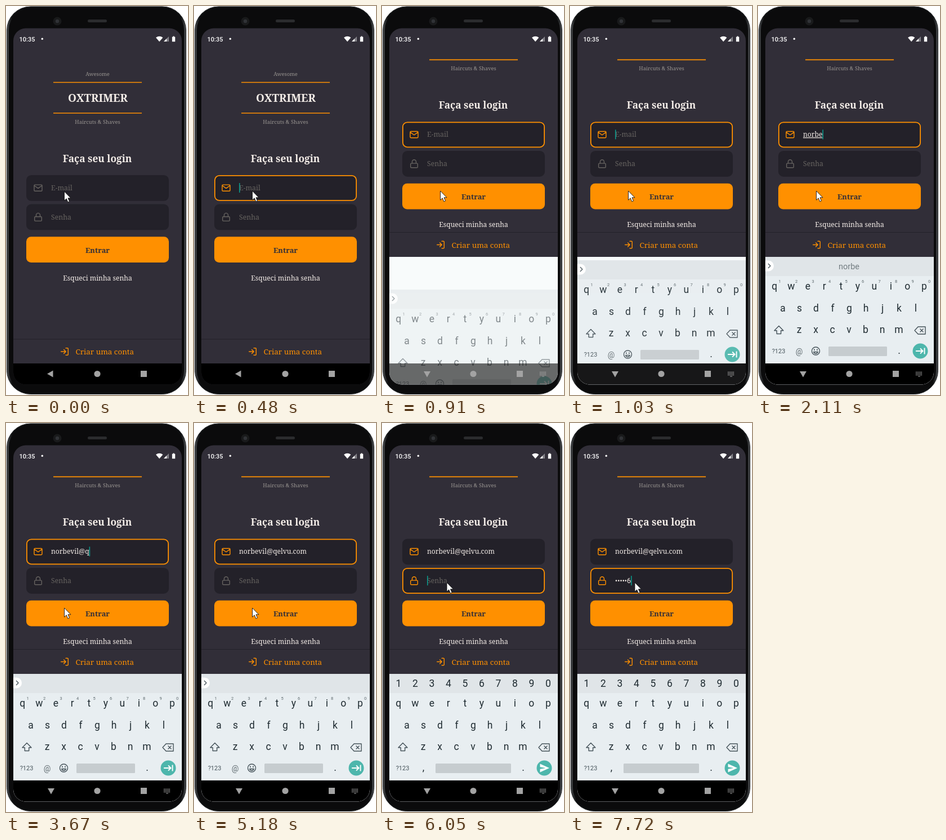
Write an HTML page that moves like this. It is 323 px wide and 690 px high and loops after 8 s.

```html
<!DOCTYPE html>
<html lang="pt">
<head>
<meta charset="utf-8">
<title>Login</title>
<style>
  html, body { margin: 0; width: 100%; height: 100%; overflow: hidden; background: #fff; }
  svg { display: block; width: 100vw; height: 100vh; }
  text { font-family: "Noto Serif", serif; fill: #f4ede8; }
  .mid { text-anchor: middle; }
  .hint { font-size: 12.3px; fill: #666360; }
  .tag { font-size: 9.3px; fill: #999591; }
  .line { fill: none; stroke-width: 2; stroke-linecap: round; stroke-linejoin: round; }
  .orange { stroke: #ff9000; }
  .field { fill: #232129; stroke: #232129; stroke-width: 1.8; }
  .field.on { stroke: #ff9000; }
  .icon { stroke: #666360; }
  .icon.on { stroke: #ff9000; }
  .roboto, #kb text, #status text { font-family: Roboto, sans-serif; }
  #kb text { fill: #1f2b31; font-size: 17.5px; text-anchor: middle; }
  #kb .sup { font-size: 7.5px; fill: #5c676c; }
  #kb .small { font-size: 11px; fill: #46535a; }
  #kb #word { font-size: 14.5px; fill: #737d82; }
  #kb.caps .letter { text-transform: uppercase; }
  .glyph { fill: none; stroke: #46535a; stroke-width: 1.4; stroke-linejoin: round; }
</style>
</head>
<body>
<svg viewBox="0 0 323 690">
  <defs>
    <clipPath id="screen"><rect x="13" y="39.5" width="299" height="632" rx="22"/></clipPath>
    <clipPath id="content"><rect x="13" y="88" width="299" height="560"/></clipPath>
    <linearGradient id="rim">
      <stop offset="0" stop-color="#4a4d50"/><stop offset=".03" stop-color="#0c0d0e"/>
      <stop offset=".97" stop-color="#0c0d0e"/><stop offset="1" stop-color="#4a4d50"/>
    </linearGradient>
  </defs>

  <rect x="1.5" y="1" width="318" height="687.5" rx="42" fill="url(#rim)" stroke="#2b2d2f"/>
  <rect x="5" y="4" width="311" height="681" rx="39" fill="#0b0b0c"/>
  <circle cx="91" cy="27" r="7.5" fill="#191a1b"/>
  <circle cx="91" cy="27" r="3.2" fill="#303236"/>
  <rect x="145" y="24" width="34" height="5" rx="2.5" fill="#2b2c2e"/>

  <g clip-path="url(#screen)">
    <rect x="13" y="39" width="299" height="633" fill="#312e38"/>

    <g clip-path="url(#content)"><g id="form">
      <text class="mid tag" x="162.5" y="124">Awesome</text>
      <path class="orange" stroke-width="1.6" d="M84 135.5h157M84 190h157"/>
      <text class="mid" x="163" y="170" font-size="19" font-weight="700">OXTRIMER</text>
      <text class="mid tag" x="162.5" y="208.5">Haircuts &amp; Shaves</text>
      <text class="mid" x="162" y="276.5" font-size="17.3" font-weight="600">Faça seu login</text>

      <rect id="mailBox" class="field" x="36.9" y="300.9" width="251.2" height="44" rx="8"/>
      <rect id="passBox" class="field" x="36.9" y="352.4" width="251.2" height="44" rx="8"/>
      <path id="mailIcon" class="line icon" transform="translate(48.6 314.3) scale(.7)"
        d="M4 4h16a2 2 0 0 1 2 2v12a2 2 0 0 1-2 2H4a2 2 0 0 1-2-2V6a2 2 0 0 1 2-2zM22 6l-10 7L2 6"/>
      <path id="passIcon" class="line icon" transform="translate(48.6 366) scale(.7)"
        d="M5 11h14a2 2 0 0 1 2 2v7a2 2 0 0 1-2 2H5a2 2 0 0 1-2-2v-7a2 2 0 0 1 2-2zM7 11V7a5 5 0 0 1 10 0v4"/>
      <text id="mailHint" class="hint" x="80" y="327">E-mail</text>
      <text id="passHint" class="hint" x="80" y="378.7">Senha</text>
      <text id="mail" x="80" y="326.7" font-size="12.1"></text>
      <text id="pass" class="roboto" x="80" y="378.7" font-size="12.5"></text>
      <rect id="caret" width="1.6" height="17" fill="#0b978a"/>

      <rect x="36" y="409.3" width="253" height="45.7" rx="8.5" fill="#ff9000"/>
      <text class="mid" x="162.5" y="437.5" font-size="12.9" font-weight="600" style="fill:#312e38">Entrar</text>
      <text class="mid" x="162.5" y="486.5" font-size="12.1">Esqueci minha senha</text>
    </g></g>

    <g id="footer">
      <rect x="13" y="591" width="299" height="44" fill="#312e38"/>
      <path d="M13 591h299" stroke="#232129"/>
      <path class="line orange" transform="translate(95.6 604.6) scale(.7)"
        d="M15 3h4a2 2 0 0 1 2 2v14a2 2 0 0 1-2 2h-4M10 17l5-5-5-5M15 12H3"/>
      <text x="123.5" y="618" font-size="13.4" style="fill:#ff9000">Criar uma conta</text>
    </g>

    <g id="panel">
      <rect x="13" y="445" width="299" height="227" fill="#f8fbfb"/>
      <g id="kb">
        <rect x="13" y="445" width="299" height="227" fill="#e8eef1"/>
        <rect x="13" y="445" width="299" height="34" fill="#e0e5e8"/>
        <path class="glyph" d="M37 567.5l8 8.3h-4.3v5.7h-7.4v-5.7H29z"/>
        <path class="glyph" d="M284 569h13v13h-13l-6-6.5zM287.5 572.5l6 6M293.5 572.5l-6 6"/>
        <circle cx="288" cy="612" r="13.5" fill="#4db6ac"/>
        <g id="mailKeys">
          <path d="M13 451.5h5.5a9.5 9.5 0 0 1 0 19H13z" fill="#fff"/>
          <path class="glyph" d="M18 457l4 4-4 4"/>
          <text id="word" x="161.5" y="467"></text>
          <circle class="glyph" cx="102.5" cy="612" r="7"/>
          <path class="glyph" d="M98.8 613.5a3.8 3.8 0 0 0 7.4 0z"/>
          <path d="M100 608.5v2.4M105 608.5v2.4" stroke="#46535a" stroke-width="1.6"/>
          <rect x="125" y="604" width="104" height="17" rx="1.5" fill="#c6cccf"/>
          <path d="M280 612h12M288 607.5l4.5 4.5-4.5 4.5M295.5 606.5v11" fill="none" stroke="#fff" stroke-width="1.9"/>
        </g>
        <g id="passKeys">
          <rect x="95" y="604" width="134" height="17" rx="1.5" fill="#c6cccf"/>
          <path d="M280.5 604.5l16.5 7.5-16.5 7.5v-5.7l10-1.8-10-1.8z" fill="#fff"/>
        </g>
      </g>
    </g>

    <rect id="nav" x="13" y="634" width="299" height="38" fill="#000"/>
    <g fill="#a3a3a3">
      <path id="back" d="M73 652.5l10.5-6v12z"/>
      <path id="down" d="M74 648h12l-6 10.5z"/>
      <circle cx="162" cy="652.5" r="5.6"/>
      <rect x="239" y="647" width="11" height="11"/>
      <g id="kbIcon" fill="none" stroke="#a3a3a3">
        <path stroke-width="1.4" stroke-dasharray="1.4 1" d="M280 649.5h12M280 652h12M280 654.5h12"/>
        <path d="M284 657h4"/>
      </g>
    </g>

    <g id="status" fill="#fff">
      <text x="23.5" y="62.7" font-size="11" font-weight="500" style="fill:#fff">10:35</text>
      <circle cx="64.3" cy="58.3" r="1.7"/>
      <path d="M266 56q6.2-4.6 12.4 0l-6.2 7.3z"/>
      <path d="M289 54v9h-9z" opacity=".4"/><path d="M285 58v5h-5z"/>
      <path d="M296.5 53.5h2v1.2h1.7v8.6h-5.4v-8.6h1.7z"/>
    </g>
  </g>

  <path id="pointer" d="M0 0v16.2l3.7-3.5 2.7 6.2 2.7-1.2-2.6-5.9h5z" fill="#fff" stroke="#111" stroke-width=".9"/>
</svg>

<script>
const $ = id => document.getElementById(id);
const LOOP = 8000, FOCUS = 480, OPEN = 910, NEXT = 5990, SWAP = 6050;
const ADDRESS = "norbevil@qelvu.com", USER_LEN = 8;

// Step tracks: [time, value...]; a value holds until the next entry.
const typed = [[0, 0], [1560, 1], [1620, 2], [1740, 3], [2110, 5], [2510, 6], [2630, 7], [2840, 8],
  [3270, 9], [3670, 10], [3730, 11], [3790, 12], [3940, 13], [4180, 14], [4330, 15], [4390, 16],
  [4510, 17], [4720, 18]];
const secret = [[0, 0], [6420, 1], [6650, 2], [6860, 3], [7070, 4], [7380, 5], [7720, 6]];
const blink = [[0, 0], [210, 1], [OPEN, 0], [970, 1], [1400, 0], [1560, 1], [5180, 0], [5550, 1],
  [NEXT, 0], [SWAP, 1]];
const mouse = [[0, 103.5, 329], [210, 103.5, 328.5], [330, 103.5, 328], [5550, 104, 324],
  [5610, 106.5, 312], [5670, 111, 296], [5780, 115, 283]];
// keyboard offset, keyboard opacity, navigation bar opacity
const rise = [[0, 58, 0, 1], [OPEN, 58, .55, .57], [970, 22, .8, .75], [1030, 6, .93, .9], [1090, 0, 1, 1]];

const at = (track, t) => track.findLast(step => step[0] <= t).slice(1);
const show = (id, on) => $(id).setAttribute("visibility", on ? "inherit" : "hidden");
const move = (id, x, y) => $(id).setAttribute("transform", `translate(${x} ${y})`);
const mark = (id, on) => $(id).classList.toggle("on", on);

function key(parent, label, x, y, cls = "") {
  const el = document.createElementNS("http://www.w3.org/2000/svg", "text");
  el.setAttribute("x", x);
  el.setAttribute("y", y);
  el.setAttribute("class", cls);
  el.textContent = label;
  $(parent).append(el);
}

const row = (parent, labels, x, y, cls) =>
  [...labels].forEach((label, i) => key(parent, label, x + i * 29.5, y, cls));

row("kb", "qwertyuiop", 29.3, 503, "letter");
row("kb", "asdfghjkl", 44, 541.5, "letter");
row("kb", "zxcvbnm", 73, 580, "letter");
row("mailKeys", "1234567890", 38.5, 491, "sup");
row("passKeys", "1234567890", 29.3, 468);
key("kb", "?123", 36.5, 616, "small");
key("kb", ".", 250.5, 617);
key("mailKeys", "@", 73, 617.5, "sup");
$("mailKeys").lastChild.style.fontSize = "14px";
key("passKeys", ",", 73.5, 617);

function draw(t) {
  const open = t >= OPEN, onPass = t >= NEXT, swapped = t >= SWAP;
  const [count] = at(typed, t), [digits] = at(secret, t), [caretOn] = at(blink, t);
  const [drop, keysAlpha, navAlpha] = at(rise, t);
  const composing = count <= USER_LEN;

  move("form", 0, open ? -94.6 : 0);
  move("footer", 0, open ? -189.5 : 0);
  move("pointer", ...at(mouse, t));

  mark("mailBox", t >= FOCUS && !onPass);
  mark("mailIcon", t >= FOCUS);
  mark("passBox", onPass);
  mark("passIcon", onPass);

  $("mail").textContent = ADDRESS.slice(0, count);
  $("mail").style.textDecoration = composing ? "underline" : "none";
  $("pass").textContent = digits ? "•".repeat(digits - 1) + digits : "";
  show("mailHint", !count);
  show("passHint", !digits);

  const input = onPass ? $("pass") : $("mail");
  const width = input.textContent ? input.getComputedTextLength() : 0;
  move("caret", 80 + width, onPass ? 365.7 : 314);
  show("caret", caretOn);

  show("panel", open);
  move("kb", 0, drop);
  $("kb").setAttribute("opacity", keysAlpha);
  $("kb").classList.toggle("caps", t >= 3210 && t < 3270);
  show("mailKeys", !swapped);
  show("passKeys", swapped);
  $("word").textContent = composing ? ADDRESS.slice(0, count) : "";

  $("nav").setAttribute("opacity", navAlpha);
  show("back", !open);
  show("down", open);
  show("kbIcon", open);
}

function tick() {
  draw(performance.now() % LOOP);
  requestAnimationFrame(tick);
}
tick();
</script>
</body>
</html>
```
